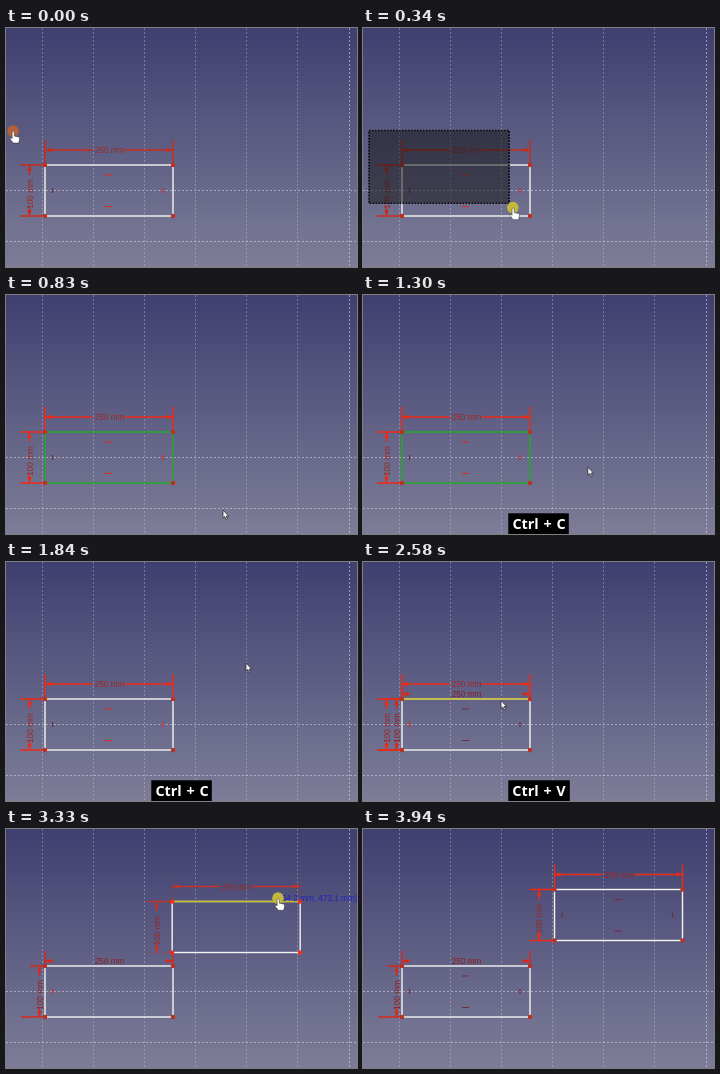
An HTML page for the animation above (4010 ms loop, 351 by 239 pixels).

```html
<!DOCTYPE html>
<html lang="en">
<head>
<meta charset="utf-8">
<title>Copy and paste in a sketch</title>
<style>
  html, body { margin: 0; width: 100%; height: 100%; overflow: hidden; background: #5c5c86; }
  svg { display: block; width: 100vw; height: 100vh; }
  text { font-family: "Liberation Sans", Arial, sans-serif; font-size: 8.2px; }
  .key { font: bold 14.4px "Open Sans", "Noto Sans", sans-serif; word-spacing: 1px; fill: #fff; }
  .grid { fill: none; stroke: #d2d2da; stroke-dasharray: 2 2; }
  .dim { stroke: currentColor; fill: none; stroke-width: 1.4; }
</style>
</head>
<body>
<svg id="stage" viewBox="0 0 351 239" preserveAspectRatio="none">
  <defs>
    <linearGradient id="sky" x1="0" y1="0" x2="0" y2="1">
      <stop offset="0" stop-color="#3f3f70"/>
      <stop offset="1" stop-color="#7d7d98"/>
    </linearGradient>
  </defs>
  <rect width="351" height="239" fill="url(#sky)"/>
  <path class="grid" stroke-opacity=".36" d="M36.5 0V239M87.5 0V239M138.5 0V239M189.5 0V239M240.5 0V239M291.5 0V239"/>
  <path class="grid" stroke-opacity=".62" d="M343.5 0V239M0 162.5H351M0 213.5H351"/>
  <g id="shapes"></g>
  <text id="coords" fill="#2222c4"></text>
  <rect id="box" x="6" y="102.5" fill="#141416" fill-opacity=".52" stroke="#08080c" stroke-width="1.6" stroke-dasharray="1.6 1.4"/>
  <g id="label">
    <rect x="145.3" y="218.3" height="21" fill="#000"/>
    <text class="key" x="176" y="234" text-anchor="middle"></text>
  </g>
  <g id="cursor">
    <circle r="5.8"/>
    <path id="hand" fill="#fff" stroke="#333" stroke-width=".5" transform="scale(1.1)"
      d="M-.8 1Q.2-.6 1.2 1V4.6L5.2 5.4Q6.2 5.8 6 7.4L5.2 11H.4L-2.6 7.4Q-2.8 6-1.6 6.2L-.8 7Z"/>
    <path id="arrow" fill="#f4f4f4" stroke="#222" stroke-width=".7" d="M0 0V8L1.8 6.5 3.1 9.3 4.4 8.7 3.2 6H5.6Z"/>
  </g>
</svg>
<script>
const LOOP = 4010, W = 128, H = 51, LEFT = 39, TOP = 137;
const PX_PER_MM = 0.512;
const YELLOW = '#c3b83c', ORANGE = '#b4623a', RED = '#dc2a1a', DARK = '#74283a';
const $ = id => document.getElementById(id);

function add(parent, tag, attrs, text) {
  const el = document.createElementNS('http://www.w3.org/2000/svg', tag);
  for (const k in attrs) el.setAttribute(k, attrs[k]);
  if (text) el.textContent = text;
  return parent.appendChild(el);
}

const show = (el, on) => el.setAttribute('visibility', on ? 'visible' : 'hidden');
const place = (el, x, y) => el.setAttribute('transform', `translate(${x} ${y})`);
const mix = (a, b, p) => a + (b - a) * p;
const mixPt = (a, b, p) => [mix(a[0], b[0], p), mix(a[1], b[1], p)];
const smooth = p => p * p * (3 - 2 * p);

// Progress held in n equal jumps: the first lands at a, the last at b.
function steps(t, a, b, n) {
  if (t < a) return 0;
  return Math.min(n, 1 + Math.floor((t - a) / (b - a) * (n - 1) + 0.05)) / n;
}

// Rectangle with its dimensions placed `gap` outside it.
function makeShape(gap, low, stub, ink) {
  const g = add($('shapes'), 'g');
  const reach = gap + 10, side = gap + 0.5;
  const rails = add(g, 'path', { class: 'dim', d: `M0 0V${-reach}M${W} 0V${-reach}M0 ${H}H${-low}` });
  add(g, 'path', { class: 'dim', d:
    `M0 0H${-reach}M0 ${-gap}H${stub}M${W} ${-gap}H${W - stub}` +
    `M${-side} 0V10M${-side} ${H}V${H - 10}` });
  add(g, 'path', { fill: 'currentColor', d:
    `M0 ${-gap}l6-2.2v4.4zM${W} ${-gap}l-6-2.2v4.4z` +
    `M${-side} 0l-2.2 6h4.4zM${-side} ${H}l-2.2-6h4.4z` });
  add(g, 'text', { x: W / 2 + .5, y: 3 - gap, fill: ink, 'text-anchor': 'middle' }, '250 mm');
  add(g, 'text', { transform: `translate(${3 - side} ${H / 2 + 3.5}) rotate(-90)`, fill: ink, 'text-anchor': 'middle' }, '100 mm');
  const marks = add(g, 'path', { 'stroke-width': 1.2, d: 'M60 10H67M60 41.5H67M118 23V28' });
  const left = add(g, 'path', { 'stroke-width': 1.2, d: 'M7.5 23V28' });
  const frame = add(g, 'rect', { width: W, height: H, fill: 'none', 'stroke-width': 1.4 });
  const edge = add(g, 'path', { d: `M0 0H${W}`, stroke: '#c2ba24', 'stroke-width': 1.5 });
  const points = add(g, 'g', { fill: '#bc3020' });
  for (const x of [0, W]) for (const y of [0, H]) add(points, 'circle', { cx: x, cy: y, r: 2.2 });
  return { g, rails, marks, left, frame, edge, points };
}

const still = makeShape(5, 24, 8, '#8c1f22');
const moving = makeShape(15, 25, 48, '#9c2822');
place(still.g, LEFT, TOP);
still.g.setAttribute('color', '#d8281a');
still.frame.setAttribute('stroke', '#f4f4f4');
still.marks.setAttribute('stroke', DARK);

function cursorAt(t) {
  if (t < 830) return mixPt([7, 103], [216, 215], smooth(steps(t, 70, 550, 8)));
  if (t < 1640) return mixPt([217, 215], [237, 106], smooth(steps(t, 1100, 1570, 7)));
  if (t < 2710) return mixPt([240, 101], [138, 138.5], smooth(steps(t, 2180, 2580, 7)));
  if (t < 3120) return mixPt([138, 138.5], [234, 83.5], steps(t, 2710, 3050, 6));
  if (t < 3730) return mixPt([234, 83.5], [291, 62], steps(t, 3120, 3460, 6));
  return mixPt([291, 62], [345, 224], steps(t, 3730, 3870, 3));
}

function shiftAt(t) {
  if (t < 3120) return mixPt([0, 0], [76.5, -40.5], steps(t, 2710, 3050, 6));
  return mixPt([76.5, -40.5], [152.5, -76.5], steps(t, 3120, 3460, 6));
}

function drawCursor(t) {
  const [x, y] = cursorAt(t);
  const between = (a, b) => t >= a && t < b;
  const hand = t < 830 || between(1640, 1840) || between(2640, 3730);
  const release = t < 70 || between(700, 830) || between(1770, 1840) || between(3660, 3730);
  const dot = $('cursor').firstElementChild;
  place($('cursor'), x, y);
  dot.setAttribute('fill', release ? ORANGE : YELLOW);
  show(dot, hand);
  show($('hand'), hand);
  show($('arrow'), !hand && t < 3940);
}

function drawShapes(t, dx, dy) {
  const pasted = t >= 2110, dropped = t >= 3730;
  const dragging = t >= 2710 && !dropped;

  place(moving.g, LEFT + dx, TOP + dy);
  moving.g.setAttribute('color', t < 700 ? '#cc2a18' : dragging ? '#c4322a' : '#ee2a14');
  moving.rails.setAttribute('opacity', dragging ? 0.25 : 1);
  moving.points.setAttribute('fill', dragging ? '#ee3018' : '#bc3020');
  moving.frame.setAttribute('stroke', t >= 700 && t < 1710 ? '#1cae20' : '#f4f4f0');
  moving.marks.setAttribute('stroke', pasted ? DARK : RED);
  moving.left.setAttribute('stroke', pasted && !dropped ? RED : '#5c3044');
  show(moving.marks, !dragging);
  show(moving.left, !dragging);
  show(moving.edge, t >= 2510 && !dropped);

  show(still.g, t >= 2110);
  for (const part of [still.frame, still.points, still.left]) show(part, t >= 2710);
  show(still.marks, dropped);
  show(still.edge, false);
  still.left.setAttribute('stroke', dropped ? DARK : RED);
}

function draw(t) {
  const [dx, dy] = shiftAt(t);
  drawShapes(t, dx, dy);

  const lag = smooth(steps(t, 70, 550, 8));
  const [w, h] = t < 630 ? [205 * lag, 106.5 * lag] : [210, 112];
  $('box').setAttribute('width', w);
  $('box').setAttribute('height', h);
  show($('box'), t >= 70 && t < 700);

  const [plate, key] = $('label').children;
  const paste = t >= 2040;
  plate.setAttribute('width', paste ? 61.5 : 60.5);
  key.textContent = paste ? 'Ctrl + V' : 'Ctrl + C';
  show($('label'), t >= 1100 && t < 2780);

  const mx = 555.2 + (dx - 76.5) / PX_PER_MM, my = 426.2 - (dy + 40.5) / PX_PER_MM;
  $('coords').textContent = `(${mx.toFixed(1)} mm, ${my.toFixed(1)} mm)`;
  $('coords').setAttribute('x', 141.5 + dx);
  $('coords').setAttribute('y', 136 + dy);
  show($('coords'), t >= 2710 && t < 3730);

  drawCursor(t);
}

const start = performance.now();
function tick() {
  draw((performance.now() - start) % LOOP);
  requestAnimationFrame(tick);
}
tick();
</script>
</body>
</html>
```
